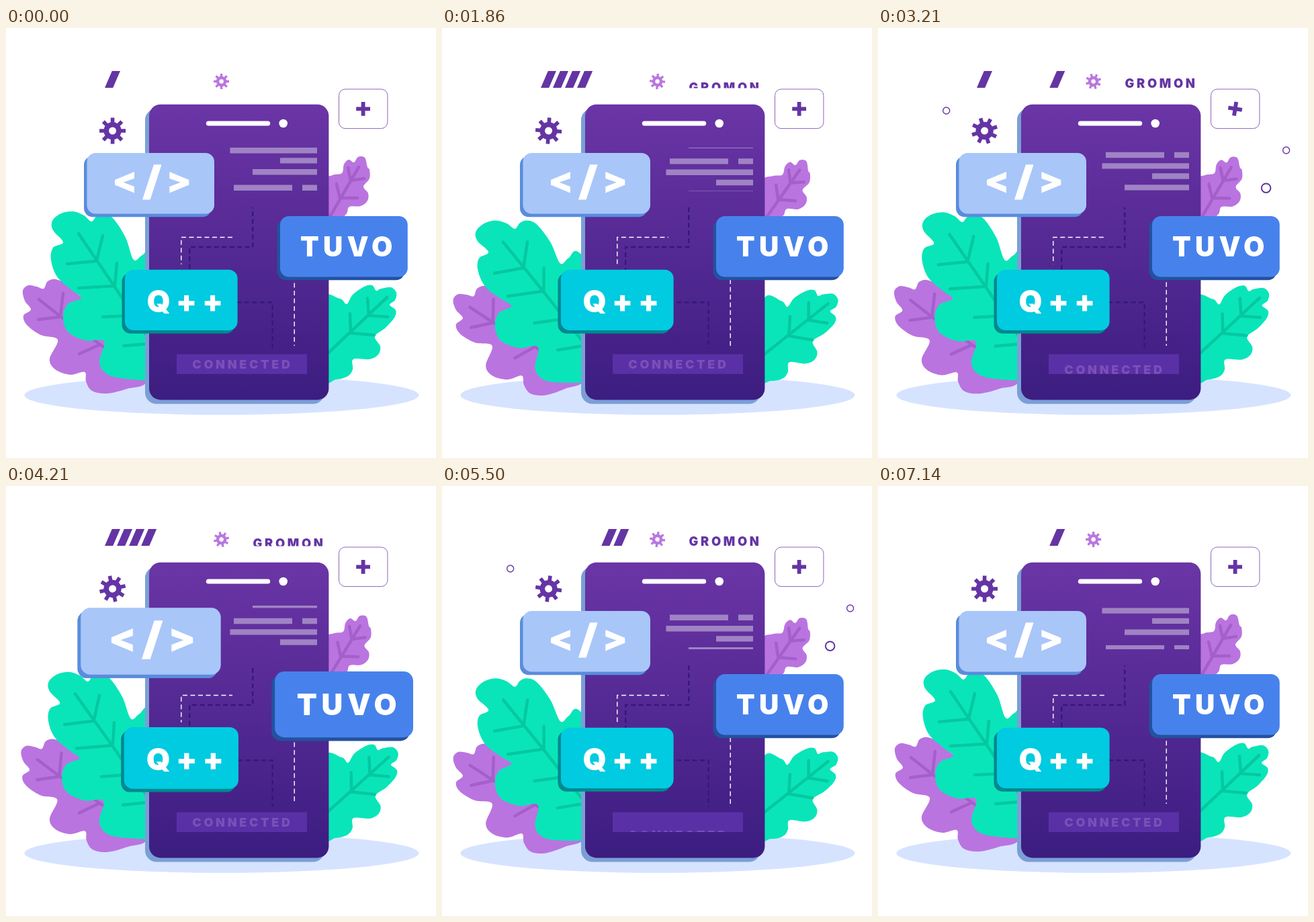
Recreate the animation shown at these times as an HTML page. Size 640 by 640 pixels, loop 7210 ms.

```html
<!DOCTYPE html>
<html lang="en">
<head>
<meta charset="utf-8">
<title>Connected code</title>
<style>
  html, body { margin: 0; width: 100%; height: 100%; overflow: hidden; background: #fff; }
  svg { display: block; width: 100vw; height: 100vh; }
  text { font-family: Inter, "Open Sans", sans-serif; font-weight: 900; }
  .vein { fill: none; stroke-width: 4.5; stroke-linecap: round; }
  .dash { fill: none; stroke-dasharray: 7 4.5; }
</style>
</head>
<body>
<svg id="stage" viewBox="0 0 640 640"></svg>
<script>
const LOOP = 7210, FPS = 14, DASH = 11.5;
const INK = '#6534a4';
const stage = document.getElementById('stage');

// Closed Catmull-Rom curve through "x,y x,y ..."
function blob(text) {
  const p = text.split(' ').map(s => s.split(',').map(Number));
  const at = i => p[(i + p.length) % p.length];
  let d = 'M' + p[0];
  p.forEach((a, i) => {
    const before = at(i - 1), b = at(i + 1), after = at(i + 2);
    const c1 = a.map((v, j) => (v + (b[j] - before[j]) / 6).toFixed(1));
    const c2 = b.map((v, j) => (v - (after[j] - a[j]) / 6).toFixed(1));
    d += `C${c1} ${c2} ${b}`;
  });
  return d + 'Z';
}

const GREEN = ['#09e5b9', '#05c8a0'], VIOLET = ['#ba74e0', '#a45fcb'];
const leaves = [
  { colors: VIOLET, pivot: '180 495', turn: -5,
    outline: '210,524 180,537 150,544 128,540 119,526 117,512 95,516 73,508 65,492 77,464 52,457 31,442 26,428 37,419 28,406 25,391 33,383 46,385 56,388 62,377 74,374 90,381 104,394 140,420 200,460',
    veins: 'M49 404L82 430L150 478M48 434L80 430M85 395L81 429M109 485L140 471' },
  { colors: GREEN, pivot: '245 508', turn: -5,
    outline: '230,524 178,522 150,515 139,497 146,466 118,465 92,452 85,430 92,411 112,402 99,391 76,370 67,345 70,327 85,319 70,301 69,287 82,276 100,273 116,279 127,288 135,280 146,277 160,284 178,312 190,345 203,338 220,332 260,400 260,510',
    veins: 'M108 306L161 384L220 474M91 351L134 347M144 309L135 346M108 387L160 384M165 350L162 383M144 430L207 427M175 473L213 470' },
  { colors: VIOLET, pivot: '475 292', turn: 5,
    outline: '470,285 496,284 507,276 511,266 528,265 538,257 539,246 532,236 541,224 541,211 538,207 534,193 524,192 518,200 510,196 503,203 500,216 486,219 470,230',
    veins: 'M525 207L478 288M509 208L513 227L533 224M492 232L497 253L523 253' },
  { colors: GREEN, pivot: '465 495', turn: 5,
    outline: '470,520 492,523 509,518 516,508 517,493 541,493 554,486 557,474 549,459 565,446 578,431 580,420 571,412 579,405 581,394 573,386 558,388 551,391 545,383 533,385 516,397 507,411 497,403 470,406',
    veins: 'M567 401L475 488M538 402L540 428L568 430M512 425L513 454L548 457' }
];

const leafMarkup = leaves.map(l => `<g class="leaf">
  <path d="${blob(l.outline)}" fill="${l.colors[0]}"/>
  <path class="vein" d="${l.veins}" stroke="${l.colors[1]}"/></g>`).join('');

const gear = (color, id) => `<g id="${id}" stroke="${color}" fill="none">
  <circle r="9.3" stroke-width="7.6"/>
  ${[0, 45, 90, 135].map(a =>
    `<path d="M0-19.5V-12M0 12V19.5" stroke-width="5.6" transform="rotate(${a})"/>`).join('')}</g>`;

const card = (id, x, y, w, h, face, side, content) => `<g id="${id}">
  <rect x="${x - 4.5}" y="${y + 4.8}" width="${w}" height="${h}" rx="13" fill="${side}"/>
  <rect x="${x}" y="${y}" width="${w}" height="${h}" rx="13" fill="${face}"/>
  <g fill="#fff">${content}</g></g>`;

const rowsMarkup = [0, 72].map(y => `<path transform="translate(0 ${y})"
  d="M333.5 178H463v8.4H333.5zM408 193.2H463v8.4H408zM367 210H463v8.4H367zM339 233.6H426v8.4H339zM441 233.6H463v8.4H441z"/>`).join('');

const slashMarkup = Array.from({ length: 7 }, (_, i) =>
  `<path class="slash" transform="translate(${147 + i * 18.05} 64)" d="M10.8 0H23L12.2 25H0z" fill="${INK}"/>`).join('');

const rings = [
  { x: 101.7, y: 123, r: 5, on: 300 },
  { x: 607.6, y: 182, r: 5, on: 150 },
  { x: 577.6, y: 238.2, r: 6.8, on: 0 }
];
const ringMarkup = rings.map(r =>
  `<circle class="ring" r="${r.r}" fill="#fff" stroke="${INK}" stroke-width="${r.r > 6 ? 2 : 1.4}"/>`).join('');

stage.innerHTML = `
<defs>
  <linearGradient id="body" x2="0" y2="1">
    <stop stop-color="#6b35a6"/><stop offset="1" stop-color="#3c1d80"/>
  </linearGradient>
  <clipPath id="rowsClip"><path d="M330 178H466V243H330z"/></clipPath>
  <clipPath id="wordClip"><path d="M360 60H486V89.4H360z"/></clipPath>
  <clipPath id="statusClip"><path d="M254 485.5H448V515H254z"/></clipPath>
</defs>
<ellipse cx="321" cy="546.5" rx="293.5" ry="29.3" fill="#d6e3ff"/>
${leafMarkup}
<rect x="207" y="120" width="267" height="439.5" rx="17" fill="#7a9fd6"/>
<rect x="213" y="113.7" width="267.4" height="439.7" rx="17" fill="url(#body)"/>
<path d="M301.3 142H389.7" stroke="#fff" stroke-width="7" stroke-linecap="round"/>
<circle cx="412.7" cy="142" r="6.3" fill="#fff"/>
<g clip-path="url(#rowsClip)"><g id="rows" fill="#a083c4">${rowsMarkup}</g></g>
<path class="dash" data-shift="0" d="M337 311.5H260.8V351.7" stroke="#fff" stroke-width="1.4"/>
<path class="dash" data-shift="5.5" d="M429.2 473V370" stroke="#fff" stroke-width="1.4"/>
<path class="dash" data-shift="5.5" d="M367.2 267V326H273.2V365" stroke="#351878" stroke-width="2.4"/>
<path class="dash" data-shift="0" d="M396.6 477V408.3H335" stroke="#351878" stroke-width="2.4"/>
<path d="M254 485.5H448V515H254z" fill="#5a30a6"/>
<g clip-path="url(#statusClip)">
  <text id="status" x="277.3" y="506.7" font-size="18" letter-spacing="3.7" fill="#7a50b8">CONNECTED</text>
</g>
${slashMarkup}
${gear(INK, 'gearBig')}${gear('#ba76df', 'gearSmall')}
<g clip-path="url(#wordClip)">
  <text id="word" x="367.5" y="89" font-size="18.3" letter-spacing="3.7" fill="${INK}">GROMON</text>
</g>
<rect x="495.5" y="91" width="72.4" height="58.6" rx="9.5" fill="#fff" stroke="#8c66bd"/>
<path id="plus" d="M-10.4 0H10.4M0-10.4V10.4" stroke="${INK}" stroke-width="5.8"/>
${ringMarkup}
${card('tagCard', 120.5, 186, 189.5, 90.5, '#a9c6f9', '#5a8cdc',
  `<path d="M191 214V224L174.5 229.7L191 236V245.5L162 233.6V226zM220 203.3H231.6L214.6 255.5H203zM243.3 214V224L259.8 229.7L243.3 236V245.5L272.3 233.6V226z"/>`)}
${card('wordCard', 408, 280, 189.8, 90.5, '#4782ec', '#23519f',
  `<text x="438" y="340" font-size="40.5" letter-spacing="6.2">TUVO</text>`)}
${card('signCard', 177, 359.7, 167.6, 90.3, '#00cbe0', '#008890',
  `<text x="209.5 253 292" y="422.5" font-size="45">Q++</text>`)}
`;

const byId = id => document.getElementById(id);
const all = name => [...document.querySelectorAll('.' + name)];
const leafNodes = all('leaf'), slashes = all('slash'), dashes = all('dash'), ringNodes = all('ring');
const move = (node, value) => node.setAttribute('transform', value);

// Sine ease from 0 to 1 between two times
function ease(t, from, to) {
  const u = Math.min(1, Math.max(0, (t - from) / (to - from)));
  return (1 - Math.cos(Math.PI * u)) / 2;
}

const cards = [
  { node: byId('tagCard'), x: 213, y: 233.5, on: 315 },
  { node: byId('wordCard'), x: 501, y: 327, on: 441 },
  { node: byId('signCard'), x: 259, y: 407, on: 573 }
];

function draw(t) {
  const half = 25000 / FPS;

  const sway = (1 - Math.cos(Math.PI * t / half)) / 2;
  leafNodes.forEach((node, i) => move(node, `rotate(${leaves[i].turn * sway} ${leaves[i].pivot})`));

  const beat = t % half;
  cards.forEach(({ node, x, y, on }) => {
    const size = 1 + 0.1 * (ease(beat, on, on + 271) - ease(beat, on + 500, on + 771));
    move(node, `translate(${x} ${y}) scale(${size}) translate(${-x} ${-y})`);
  });

  const spin = 360 * t / (4 * half);
  move(byId('gearBig'), `translate(158.6 153) rotate(${spin})`);
  move(byId('gearSmall'), `translate(320.6 79.5) scale(.59) rotate(${spin})`);
  move(byId('plus'), `translate(531.6 120.3) rotate(${90 * ease(t % (2 * half), 3121, 3571)})`);

  move(byId('rows'), `translate(0 ${-(t % 1200) * 0.06})`);
  dashes.forEach(node =>
    node.setAttribute('stroke-dashoffset', +node.dataset.shift + DASH * t / 3600));

  const run = t % 800;
  slashes.forEach((node, i) => {
    const hideAt = 345 + 79 * i;
    const tail = t >= 800 && run + 800 < hideAt;
    node.setAttribute('visibility', tail || (run >= 71 * i && run < hideAt) ? 'visible' : 'hidden');
  });

  const scene = t % 2400;
  rings.forEach(({ x, y, on }, i) => {
    const size = ease(scene, on, on + 180) - ease(scene, 1480, 1720);
    move(ringNodes[i], `translate(${x} ${y}) scale(${Math.max(0, size)})`);
  });
  const wordDrop = 1 - ease(scene, 300, 600) + ease(scene, 1700, 2100);
  move(byId('word'), `translate(0 ${17 * wordDrop})`);
  const statusDrop = ease(scene, 250, 560) - ease(scene, 620, 950);
  move(byId('status'), `translate(0 ${22 * statusDrop})`);
}

const start = performance.now();
function tick() {
  const ms = (performance.now() - start) % LOOP;
  draw(Math.floor((ms + 5) * FPS / 1000) * 1000 / FPS);
  requestAnimationFrame(tick);
}
tick();
</script>
</body>
</html>
```
